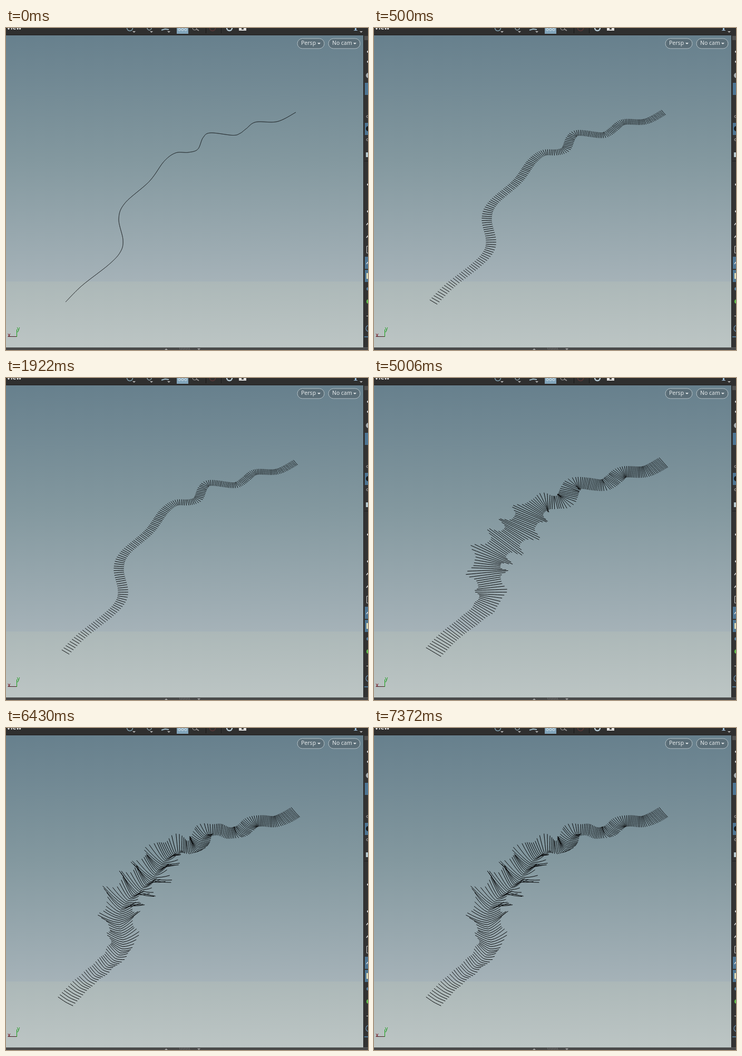
Write an HTML page with a canvas that moves like this. It is 687 px wide and 611 px high and loops after 8000 ms.

```html
<!DOCTYPE html>
<html lang="en">
<head>
<meta charset="utf-8">
<title>Ribbon along a curve</title>
<style>
  html, body { margin: 0; width: 100%; height: 100%; overflow: hidden; background: #323232; }
  canvas { display: block; }
</style>
</head>
<body>
<canvas id="stage" width="687" height="611"></canvas>
<script>
const ctx = document.getElementById('stage').getContext('2d');
const LOOP = 8000;
const STAGE_STARTS = [500, 2870, 6430];
const INK = '#050607';

// Key points of the curve, joined by a Catmull-Rom spline.
const KNOTS = [
  [113, 520], [144, 489], [195, 449], [217, 425], [222, 402], [214, 362], [226, 332],
  [272, 291], [300, 253], [322, 237], [346, 236], [364, 230], [374, 208], [388, 199],
  [430, 203.5], [444, 200], [456, 191], [474, 178.5], [515, 177.5], [550, 160]
];

const bell = (x, center, spread) => Math.exp(-(((x - center) / spread) ** 2) / 2);

function curveAt(p) {
  const last = KNOTS.length - 1;
  const i = Math.min(Math.floor(p), last - 1), t = p - i;
  const [a, b, c, d] = [-1, 0, 1, 2].map(k => KNOTS[Math.max(0, Math.min(last, i + k))]);
  return b.map((v, k) => v + 0.5 * t * (c[k] - a[k] +
    t * (2 * a[k] - 5 * v + 4 * c[k] - d[k] + t * (3 * (v - c[k]) + d[k] - a[k]))));
}

function samplePath(perKnot) {
  const path = [];
  let s = 0;
  for (let n = 0; n <= (KNOTS.length - 1) * perKnot; n++) {
    const [x, y] = curveAt(n / perKnot), prev = path.at(-1);
    if (prev) s += Math.hypot(x - prev.x, y - prev.y);
    path.push({ x, y, s });
  }
  return path;
}

// Ribs follow the curve normal, flattened by the view and shrinking with distance.
function placeRibs(path) {
  const total = path.at(-1).s, ribs = [];
  let next = 0;
  path.forEach(({ x, y, s }, i) => {
    if (s < next) return;
    const a = path[Math.max(0, i - 3)], b = path[Math.min(path.length - 1, i + 3)];
    const len = Math.hypot(b.x - a.x, b.y - a.y), u = s / total;
    const size = 20 - 2.5 * u;
    const spike = Math.abs(Math.cos(Math.PI * (s - 307) / 36)) ** 5;
    ribs.push({
      x, y,
      dx: size * (a.y - b.y) / len,
      dy: size * 0.6 * (b.x - a.x) / len,
      swell: 1 + bell(s, 275, 75) * (0.45 + 1.4 * spike),
      curl: bell(s, 290, 125) * (19 + 5 * Math.sin(s / 5))
    });
    next += 5.6 / (1 + 1.2 * u);
  });
  return ribs;
}

const path = samplePath(80);
const ribs = placeRibs(path);

function rect(x, y, w, h, color) {
  ctx.fillStyle = color;
  ctx.fillRect(x, y, w, h);
}

function polyline(points, color, width = 1) {
  ctx.beginPath();
  points.forEach(([x, y]) => ctx.lineTo(x, y));
  ctx.strokeStyle = color;
  ctx.lineWidth = width;
  ctx.stroke();
}

function disc(x, y, r, color, ring = 0) {
  ctx.beginPath();
  ctx.arc(x, y, r, 0, 2 * Math.PI);
  ctx.fillStyle = ctx.strokeStyle = color;
  ctx.lineWidth = ring;
  ring ? ctx.stroke() : ctx.fill();
}

function arrow(x, y, color, h = 3) {
  ctx.beginPath();
  ctx.moveTo(x - 3, y);
  ctx.lineTo(x + 3, y);
  ctx.lineTo(x, y + h);
  ctx.fillStyle = color;
  ctx.fill();
}

function label(text, x, y, size, color, weight = 400) {
  ctx.font = `${weight} ${size}px "Noto Sans", sans-serif`;
  ctx.fillStyle = color;
  ctx.fillText(text, x, y);
}

function pill(text, x, w) {
  ctx.beginPath();
  ctx.roundRect(x, 20, w, 19, 9.5);
  ctx.fillStyle = '#5b6e78';
  ctx.fill();
  ctx.strokeStyle = '#b4c0c5';
  ctx.lineWidth = 1;
  ctx.stroke();
  label(text, x + 7, 32, 10.5, '#e3e8ea');
  arrow(x + w - 10, 28, '#e3e8ea');
}

function drawBackdrop() {
  const sky = ctx.createLinearGradient(0, 14, 0, 606);
  sky.addColorStop(0, '#67808d');
  sky.addColorStop(0.4, '#83989f');
  sky.addColorStop(0.788, '#a5b2b8');
  sky.addColorStop(0.79, '#acb8b8');
  sky.addColorStop(1, '#bcc5c4');
  rect(0, 14, 678, 592, sky);
}

function drawTopBar() {
  rect(0, 0, 687, 14, '#2f2f2f');
  rect(0, 12, 678, 1, '#272727');
  label('View', 1, 3, 12, '#e6e6e6', 600);
  disc(235, 0, 5.5, '#7f9cab', 1.5);
  disc(272, 0, 4, '#8aa0ac', 1.5);
  polyline([[295, 4], [302, 2], [309, 3]], '#9fb9c8', 2);
  for (const x of [243, 276, 309, 674]) arrow(x, 6, '#b5b5b5');
  rect(324, 0, 22, 11, '#82a5bb');
  for (let x = 329; x < 345; x += 6) disc(x, 3, 2.2, '#e0eaf0', 1);
  disc(358, 0, 4, '#9a9a9a', 1);
  polyline([[361, 2], [366, 5]], '#9a9a9a', 1.5);
  rect(379, 0, 1, 10, '#191919');
  rect(408, 0, 1, 10, '#191919');
  disc(392, 0, 5.5, '#593838', 1.5);
  disc(424, 0, 5, '#b8cbd6', 2.5);
  rect(442, 0, 14, 5, '#dedede');
  rect(447, 0, 4, 3, '#444');
  rect(662, 0, 3, 4, '#9bbbd6');
  rect(660, 4, 7, 1, '#9bbbd6');
}

function drawSideBar() {
  rect(678, 14, 9, 597, '#333333');
  rect(678, 14, 1, 592, '#252525');
  rect(680, 15, 7, 8, '#505050');
  rect(680, 252, 7, 1, '#1d1d1d');
  for (const y of [104, 180, 434, 459]) rect(681, y, 6, 23, '#4d7593');
  for (const y of [45, 64, 297, 348]) disc(687, y, 2, '#dddddd');
  for (const y of [168, 212]) disc(686, y, 2, '#b5aeae', 1);
  for (const y of [372, 396, 446]) polyline([[684, y + 2], [687, y - 2]], '#dddddd', 1.5);
  disc(688, 90, 5, '#aab0b3');
  disc(688, 191, 5, '#16191b');
  rect(683, 236, 4, 9, '#b7c9cf');
  polyline([[687, 414], [684.5, 414], [684.5, 427], [687, 427]], '#d0d0d0');
  rect(684, 465, 3, 11, '#d9d9b8');
  disc(687, 495, 3, '#557f9f');
  disc(688, 519, 4, '#62bd4c');
  rect(684, 546, 3, 1, '#dddddd');
  disc(689, 570, 6, '#6b94b5', 1.2);
  rect(680, 585, 7, 2, '#4f7896');
}

function drawBottomBar() {
  rect(0, 606, 687, 5, '#484848');
  rect(0, 606, 687, 1, '#5c6060');
  arrow(304, 611, '#a0a0a0', -3);
  arrow(366, 608, '#a0a0a0');
  for (let x = 329; x < 349; x += 3) {
    rect(x, 607, 1, 1, '#999');
    rect(x + 1, 609, 1, 1, '#999');
  }
}

function drawAxes() {
  polyline([[4, 585.5], [20, 585.5]], '#451a20');
  polyline([[20.5, 586], [20.5, 572]], '#16a016');
  label('x', 3, 586, 11, '#75141f');
  label('y', 21, 574, 10, '#189a18');
}

function drawRib({ x, y, dx, dy }, scale, curl) {
  const points = [];
  for (let w = -1; w <= 1; w += 0.25) {
    points.push([x + dx * scale * w, y + dy * scale * w - curl * Math.abs(w) ** 1.4]);
  }
  polyline(points, INK);
}

function draw(time) {
  const stage = STAGE_STARTS.filter(t => time >= t).length;
  drawBackdrop();
  drawTopBar();
  drawSideBar();
  drawBottomBar();
  pill('Persp', 553, 51);
  pill('No cam', 612, 60);
  drawAxes();
  if (stage === 0) polyline(path.map(({ x, y }) => [x, y]), INK);
  else for (const rib of ribs) {
    drawRib(rib, stage === 1 ? 0.5 : rib.swell, stage === 3 ? rib.curl : 0);
  }
}

const start = performance.now();
function tick() {
  draw((performance.now() - start) % LOOP);
  requestAnimationFrame(tick);
}
tick();
</script>
</body>
</html>
```
